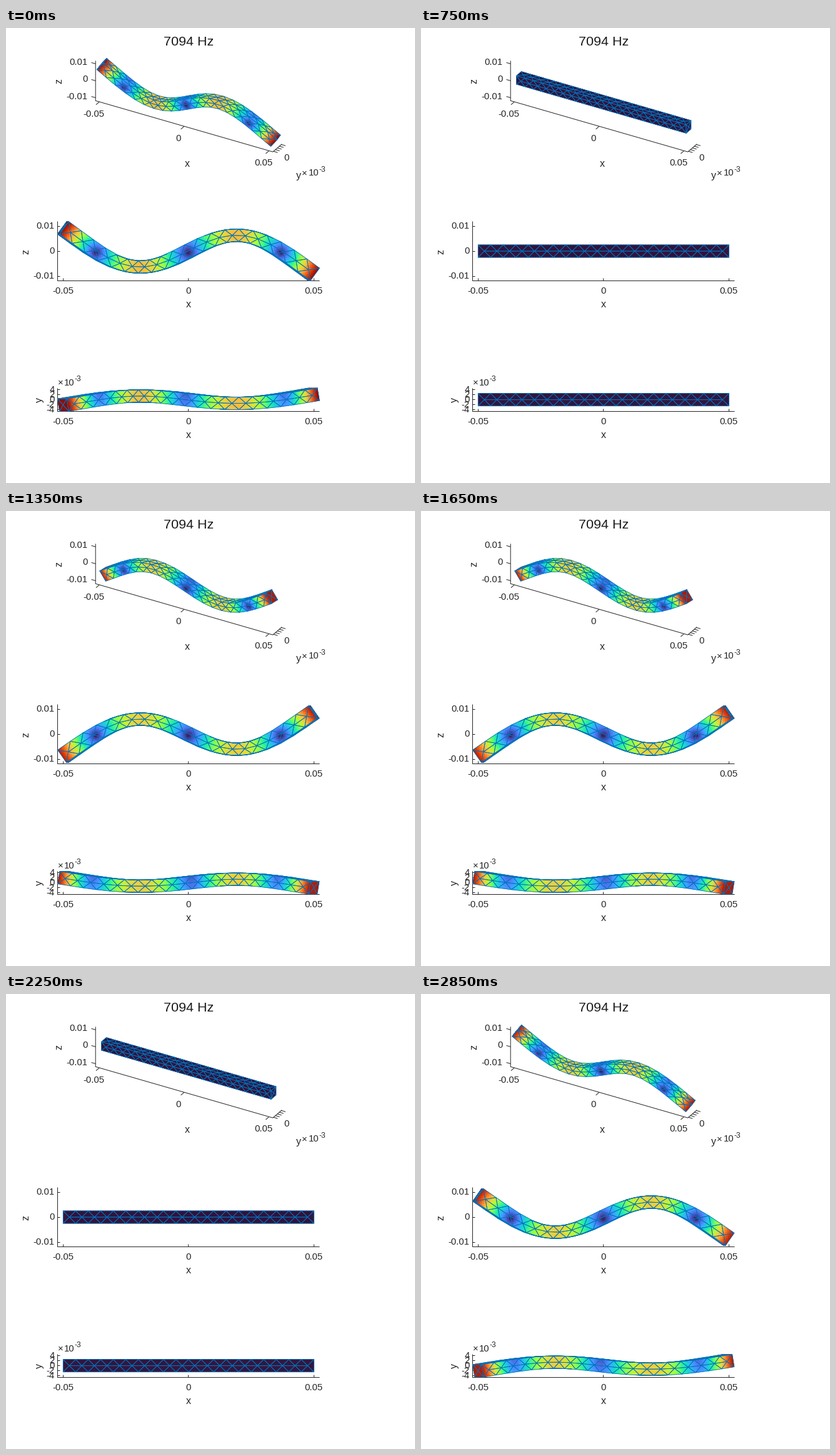
These frames come from a looping animation (654x728 px, 3 s). A matplotlib script:

```python
import numpy as np
import matplotlib.pyplot as plt
from matplotlib.animation import FuncAnimation
from matplotlib.collections import LineCollection, PolyCollection

W, H = 654, 728
FRAMES, INTERVAL = 20, 150
PT = 0.72                      # points per pixel at 100 dpi
INK = "#262626"
EDGE = (0, 0.447, 0.741)

plt.rcParams["font.family"] = "Liberation Sans"
fig = plt.figure(figsize=(W / 100, H / 100), dpi=100, facecolor="white")
ax = fig.add_axes([0, 0, 1, 1])
ax.set_xlim(0, W)
ax.set_ylim(H, 0)
ax.axis("off")

# Beam: half length, half thickness, cells along it, bending amplitudes
HALF, T, CELLS = 0.05, 0.0025, 20
AMP_Y, AMP_Z = 0.00214, 0.00928
BETA = 78.532                  # second free-free bending mode
SHEAR = 0.03                   # thick-beam correction of the mode
LIMITS = np.array([0.05224, 0.00464, 0.01178])


def mode(x):
    """Mode shape (1 at the right end) and its slope."""
    a = (1 + SHEAR) / (2 * np.sin(BETA * HALF))
    b = (1 - SHEAR) / (2 * np.sinh(BETA * HALF))
    shape = a * np.sin(BETA * x) + b * np.sinh(BETA * x)
    slope = BETA * (a * np.cos(BETA * x) + b * np.cosh(BETA * x))
    return shape, slope


def displacement(p):
    x, y, z = np.moveaxis(p, -1, 0)
    w, dw = mode(x)
    ux = -y * AMP_Y * dw + z * AMP_Z * dw
    return np.stack([ux, AMP_Y * w, -AMP_Z * w], axis=-1)


def side_triangles():
    """Flat (x, t) triangles of one long face."""
    xs = np.linspace(-HALF, HALF, CELLS + 1)
    mid = (xs[:-1] + xs[1:]) / 2
    tris = []
    for t in (-T, T):
        for i in range(CELLS):
            tris.append([(xs[i], t), (xs[i + 1], t), (mid[i], 0)])
        for i in range(CELLS - 1):
            tris.append([(mid[i], 0), (mid[i + 1], 0), (xs[i + 1], t)])
    for xe, c in ((xs[0], mid[0]), (xs[-1], mid[-1])):
        tris.append([(xe, -T), (xe, T), (c, 0)])
    return np.array(tris)


def build_mesh():
    flat = side_triangles()
    x, t = flat[..., 0], flat[..., 1]
    parts = []
    for side in (-T, T):
        fixed = np.full_like(x, side)
        parts.append(np.stack([x, t, fixed], axis=-1))
        parts.append(np.stack([x, fixed, t], axis=-1))
    ring = [(-T, -T), (T, -T), (T, T), (-T, T)]
    for xe in (-HALF, HALF):
        parts.append(np.array([[(xe, *ring[i]), (xe, *ring[(i + 1) % 4]), (xe, 0, 0)]
                               for i in range(4)]))
    mesh = np.concatenate(parts)
    inward = np.sum(normals(mesh) * mesh.mean(axis=1), axis=1) < 0
    mesh[inward] = mesh[inward][:, ::-1]
    return mesh


def normals(tris):
    n = np.cross(tris[:, 1] - tris[:, 0], tris[:, 2] - tris[:, 0])
    return n / np.linalg.norm(n, axis=1, keepdims=True)


def split_weights(n):
    """Barycentric corners of the n*n pieces of a triangle."""
    def corner(i, j):
        return (i / n, j / n, 1 - (i + j) / n)
    pieces = []
    for i in range(n):
        for j in range(n - i):
            pieces.append([corner(i, j), corner(i + 1, j), corner(i, j + 1)])
            if i + j < n - 1:
                pieces.append([corner(i + 1, j), corner(i + 1, j + 1), corner(i, j + 1)])
    return np.array(pieces)


MESH = build_mesh()
DISP = displacement(MESH)
PIECES = split_weights(5)
# Colour follows the length of the interpolated displacement
LEVEL = np.linalg.norm(np.einsum("pc,tcd->tpd", PIECES.mean(axis=1), DISP), axis=-1)
LEVEL /= np.linalg.norm(DISP, axis=-1).max()
TURBO = plt.get_cmap("turbo")


class View:
    """Orthographic view of the beam; right and up are scaled screen vectors."""

    def __init__(self, origin, scale, right, up):
        self.origin = np.array(origin)
        self.axes = scale * np.array([right, -np.array(up)]).T
        self.toward = np.cross(right, up)
        self.fill = PolyCollection([], linewidths=0.6 * PT, zorder=3)
        self.wire = PolyCollection([], facecolors="none", edgecolors=[EDGE],
                                   linewidths=0.85 * PT, joinstyle="round", zorder=4)
        ax.add_collection(self.fill, autolim=False)
        ax.add_collection(self.wire, autolim=False)

    def project(self, p):
        return self.origin + np.asarray(p) @ self.axes

    def draw(self, amp):
        tris = MESH + amp * DISP
        seen = normals(tris) @ self.toward > 1e-4
        flat = self.project(tris[seen])
        small = np.einsum("pkc,tcd->tpkd", PIECES, flat).reshape(-1, 3, 2)
        colors = TURBO(abs(amp) * LEVEL[seen].ravel())
        self.fill.set_verts(small)
        self.fill.set_facecolor(colors)
        self.fill.set_edgecolor(colors)
        self.wire.set_verts(flat)


C30, S30 = np.cos(np.pi / 6), 0.5
iso = View((292.2, 119), 3133, (C30, S30, 0), (-S30 * S30, S30 * C30, C30))
front = View((291.8, 357), 4010, (1, 0, 0), (0, 0, 1))
top = View((291.8, 594.7), 4010, (1, 0, 0), (0, 1, 0))
views = [iso, front, top]


def label(x, y, s, size=14.9, ha="center", rotation=0, color=INK):
    ax.text(x, y, s, fontsize=size * PT, ha=ha, va="center",
            rotation=rotation, color=color)


def lines(segments):
    ax.add_collection(LineCollection(segments, colors=INK, linewidths=PT, zorder=1),
                      autolim=False)


def power(x, y):
    label(x, y + 0.5, "×", ha="left")
    label(x + 10.5, y, "10", ha="left")
    label(x + 27.5, y - 5.5, "-3", 12, ha="left")


def iso_axes():
    lx, ly, lz = LIMITS
    corner, far = (-lx, -ly, -lz), (lx, -ly, -lz)
    path = [iso.project(p) for p in ((-lx, -ly, lz), corner, far, (lx, ly, -lz))]
    segs = [path]
    out_x = np.array([6.7, 1.9])
    out_y = np.array([-5.3, 4.6])
    for z, text in ((0.01, "0.01"), (0, "0"), (-0.01, "-0.01")):
        p = iso.project((-lx, -ly, z))
        segs.append([p, p - out_x])
        label(130.5, p[1] - 2, text, ha="right")
    for x, text in ((-0.05, "-0.05"), (0, "0"), (0.05, "0.05")):
        p = iso.project((x, -ly, -lz))
        segs.append([p, p + out_y])
        label(p[0] - 9, p[1] + 20, text)
    for y in np.arange(-2, 3) * 0.002:
        p = iso.project((lx, y, -lz))
        segs.append([p, p + out_x])
    lines(segs)
    label(449, 207.5, "0")
    label(290, 218, "x", 16)
    label(85, 85, "z", 16, rotation=90)
    label(468, 236, "y", 16)
    power(473, 232.5)


def flat_axes(view, half, marks, step, name, name_x):
    cx, cy = view.origin - 0.4
    x0, x1 = cx - LIMITS[0] * 4010, cx + LIMITS[0] * 4010
    y0, y1 = cy - half * 4010, cy + half * 4010
    segs = [[(x0, y0), (x0, y1), (x1, y1)]]
    for x, text in ((-0.05, "-0.05"), (0, "0"), (0.05, "0.05")):
        px = cx + x * 4010
        segs.append([(px, y1), (px, y1 - 4.2)])
        label(px, y1 + 17, text)
    for k, text in marks:
        py = cy - k * step * 4010
        segs.append([(x0, py), (x0 + 4.2, py)])
        label(77.5, py + 0.5, text, ha="right")
    lines(segs)
    label(292, y1 + 38.4, "x", 16)
    label(name_x, cy + 1, name, 16, rotation=90)


iso_axes()
flat_axes(front, LIMITS[2], [(1, "0.01"), (0, "0"), (-1, "-0.01")], 0.01, "z", 32)
flat_axes(top, LIMITS[1], [(k, str(2 * k)) for k in range(-2, 3)], 0.002, "y", 53)
power(82.5, 567.5)
label(292, 22, "7094 Hz", 21.5, color="#1a1a1a")


def update(frame):
    amp = np.cos(2 * np.pi * frame / FRAMES)
    for view in views:
        view.draw(amp)
    return []


anim = FuncAnimation(fig, update, frames=FRAMES, interval=INTERVAL,
                     init_func=lambda: update(0), repeat=True, repeat_delay=0)
plt.show()
```
